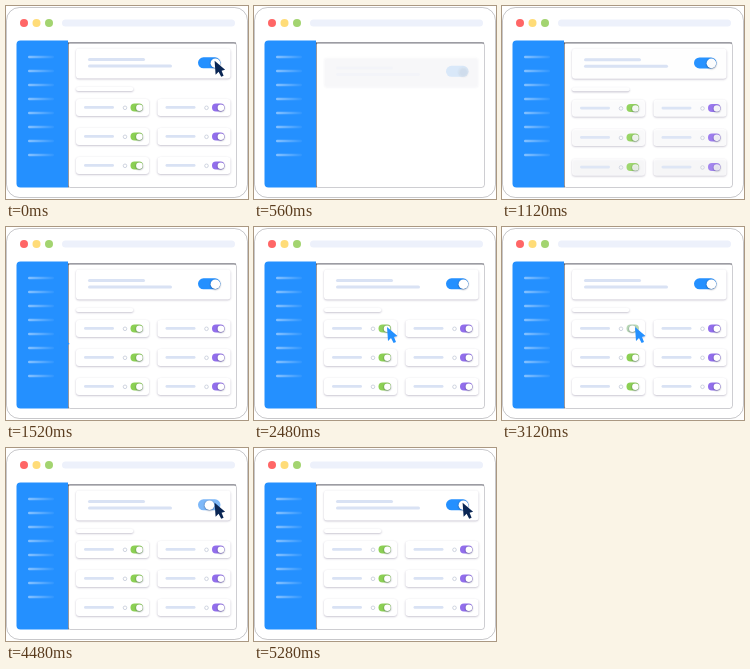
Recreate the animation shown at these times as an HTML page with a canvas. Size 242x193 px, loop 5760 ms.

```html
<!DOCTYPE html>
<html lang="en">
<head>
<meta charset="utf-8">
<title>Settings panel</title>
<style>
html, body { margin: 0; width: 100%; height: 100%; overflow: hidden; background: #fff; }
canvas { display: block; }
</style>
</head>
<body>
<canvas id="stage" width="242" height="193"></canvas>
<script>
const ctx = document.getElementById('stage').getContext('2d');
const LOOP = 5760, STEP = 80;
const BLUE = [36, 144, 255], NAVY = [10, 38, 84], OFF = [214, 224, 243];
const GREEN = [140, 208, 84], PURPLE = [146, 110, 236];
const LINE = '#d9e2f4';

const clamp = x => Math.min(1, Math.max(0, x));
const mix = (a, b, k) => a + (b - a) * k;
const rgb = (a, b = a, k = 0) => `rgb(${a.map((v, i) => Math.round(mix(v, b[i], k)))})`;
const inOut = x => x < .5 ? 4 * x ** 3 : 1 - (2 - 2 * x) ** 3 / 2;
const ease = (t, from, to) => inOut(clamp((t - from) / (to - from)));

function box(x, y, w, h, r, fill) {
  ctx.beginPath();
  ctx.roundRect(x, y, w, h, r);
  ctx.fillStyle = fill;
  ctx.fill();
}

function disc(x, y, r, fill) {
  box(x - r, y - r, 2 * r, 2 * r, r, fill);
}

function withShadow(color, blur, dy, draw) {
  ctx.save();
  ctx.shadowColor = color;
  ctx.shadowBlur = blur;
  ctx.shadowOffsetY = dy;
  draw();
  ctx.restore();
}

function card(x, y, w, h, r = 3) {
  withShadow('rgba(70,60,100,.34)', 2, .8, () => box(x, y, w, h, r, '#fff'));
}

// on: 1 = knob right and coloured, 0 = knob left and pale
function toggle(x, y, w, h, color, on) {
  const r = h / 2;
  box(x, y, w, h, r, rgb(OFF, color, on));
  withShadow('rgba(20,30,60,.6)', 2, .5, () =>
    disc(mix(x + r, x + w - r + .4, on), y + r + .4, r - .7, '#fff'));
}

function drawWindow() {
  ctx.fillStyle = '#fff';
  ctx.fillRect(0, 0, 242, 193);
  ctx.beginPath();
  ctx.roundRect(.5, 1.5, 241, 190, 13);
  ctx.strokeStyle = 'rgba(70,70,80,.3)';
  ctx.lineWidth = 1;
  ctx.stroke();

  ['#ff6666', '#ffdc78', '#a3d470'].forEach((c, i) => disc(18 + 12.5 * i, 17, 4, c));
  box(56, 13.5, 173, 7, 3.5, '#edf1fb');

  ctx.beginPath();
  ctx.roundRect(61.5, 36.5, 169, 145, 3);
  ctx.strokeStyle = 'rgba(60,60,75,.25)';
  ctx.stroke();
  ctx.fillStyle = 'rgba(40,40,55,.6)';
  ctx.fillRect(62, 36.5, 168, 1);
  ctx.fillRect(62, 36.5, .8, 145);

  box(10.5, 34.5, 51.5, 147, [4, 0, 0, 4], rgb(BLUE));
  const fade = ctx.createLinearGradient(22, 0, 48, 0);
  fade.addColorStop(0, 'rgba(255,255,255,.45)');
  fade.addColorStop(1, 'rgba(255,255,255,.05)');
  for (let i = 0; i < 8; i++) box(22, 49.8 + 14 * i, 26, 2.4, 1.2, fade);
}

// Staggered fade and rise of one content group
function reveal(t, index, draw) {
  const rest = t < 480 ? 0 : (1 - clamp((t - 520 - 60 * index) / 800)) ** 3;
  if (rest === 1) return;
  ctx.save();
  ctx.globalAlpha = 1 - rest;
  ctx.translate(0, 10 * rest);
  draw();
  ctx.restore();
}

function row(x, y, color, on) {
  card(x, y, 73, 17);
  box(x + 8, y + 7, 30, 2.8, 1.4, LINE);
  ctx.beginPath();
  ctx.arc(x + 49, y + 8.8, 1.8, 0, 7);
  ctx.strokeStyle = '#c3c9d8';
  ctx.lineWidth = .8;
  ctx.stroke();
  toggle(x + 54.5, y + 4.4, 12.5, 8, color, on);
}

function drawCursor(t) {
  if (t >= 480 && t < 1280) return;
  const enter = t < 480 ? 1 : ease(t, 1280, 1920);
  const move = t < 480 ? 1 : ease(t, 3240, 4320);
  ctx.save();
  ctx.translate(mix(mix(32, 133, enter), 208.6, move), mix(mix(110, 100, enter), 54.7, move));
  ctx.fillStyle = rgb(BLUE, NAVY, move);
  ctx.fill(new Path2D('M0 0L1 14L4 11L6.6 16L9 15L7 10L10.5 9Z'));
  ctx.restore();
}

// A clicked toggle switches off, rests, then switches on again
function switched(t, start) {
  return 1 - ease(t, start, start + 320) + ease(t, start + 520, start + 960);
}

function draw(t) {
  drawWindow();
  reveal(t, 0, () => {
    card(70, 42.5, 154.5, 30);
    box(82, 52, 57, 3, 1.5, LINE);
    box(82, 58.5, 84, 3, 1.5, LINE);
    toggle(192, 51.3, 22.5, 11, BLUE, switched(t, 4320));
  });
  reveal(t, 1, () => card(70, 81, 57.5, 4, 2));
  for (let i = 0; i < 3; i++) {
    reveal(t, 2 + i, () => {
      const y = 93 + 29 * i;
      row(70, y, GREEN, i ? 1 : switched(t, 2400));
      row(151.5, y, PURPLE, 1);
    });
  }
  drawCursor(t);
}

function tick() {
  const t = performance.now() % LOOP;
  draw(Math.floor(t / STEP) * STEP);
  requestAnimationFrame(tick);
}
tick();
</script>
</body>
</html>
```
